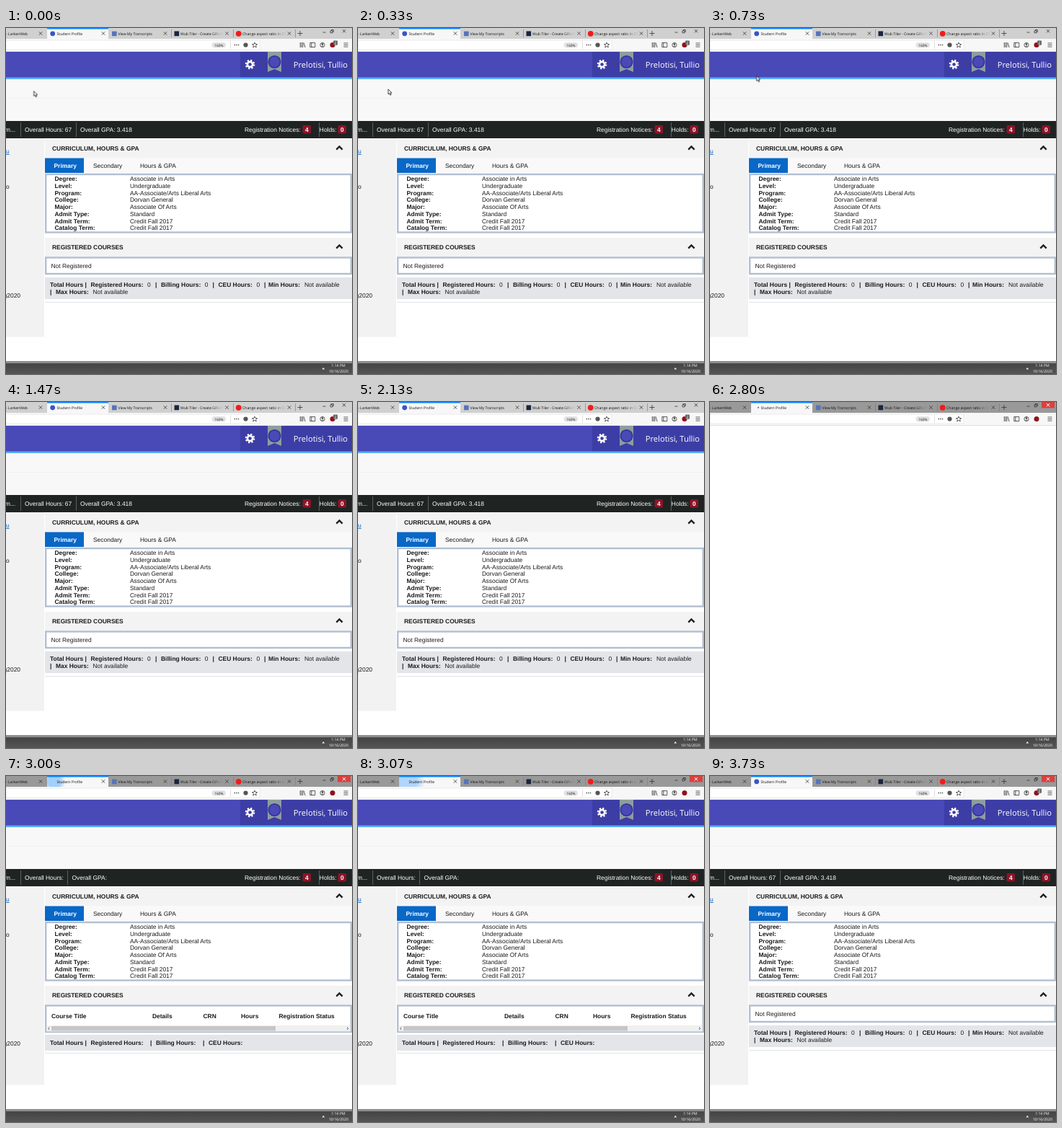
Recreate the animation shown at these times as an HTML page. Size 480 px wide and 480 px high, loop 4070 ms.

```html
<!DOCTYPE html>
<html lang="en">
<head>
<meta charset="utf-8">
<title>Student profile reload</title>
<style>
html, body { margin: 0; width: 100%; height: 100%; overflow: hidden; background: #fff; }
svg { display: block; width: 100vw; height: 100vh; }
text { font: 8.43px "Liberation Sans", Arial, sans-serif; fill: #1a1a1a; white-space: pre; text-rendering: geometricPrecision; }
.b text, text.b { font-weight: 700; }
.ui text { font: 5.15px "Open Sans", "Noto Sans", sans-serif; fill: #111; }
.light text { fill: #fff; }
.head { fill: #f3f3f4; }
.box { fill: #fff; stroke: #b3bfd0; stroke-width: 2.4; }
.line { fill: none; stroke: #333; stroke-width: .8; }

.strip, .icon, .badge, .dot, .burst, .page, .fresh, .ready, .closer, .cursor {
  animation: 4070ms step-end infinite;
}
.strip { animation-name: strip; animation-timing-function: linear; }
.closer { animation-name: closer; animation-timing-function: linear; }
.icon { animation-name: icon; }
.badge { animation-name: badge; }
.dot { animation-name: dot; }
.burst { animation-name: burst; transform-origin: 67px 8px; }
.page { animation-name: page; }
.fresh { animation-name: fresh; }
.ready { animation-name: ready; }
.cursor { animation-name: cursor; }

@keyframes strip { 0%, 55.6% { fill: #d0d0d0; } 62%, 100% { fill: #999; } }
@keyframes closer { 0%, 55.6% { opacity: 0; } 62%, 100% { opacity: 1; } }
@keyframes icon { 0% { opacity: 1; } 55.68% { opacity: 0; } 86.63%, 100% { opacity: 1; } }
@keyframes badge { 0% { opacity: 1; } 55.68% { opacity: 0; } 91.55%, 100% { opacity: 1; } }
@keyframes dot {
  0% { opacity: 0; transform: none; }
  55.68% { opacity: 1; transform: none; animation-timing-function: steps(2, start); }
  58.9% { opacity: 1; transform: translateX(5px); animation-timing-function: steps(3, start); }
  63.7% { opacity: 1; transform: translateX(-5px); animation-timing-function: steps(2, start); }
  67%, 73.6% { opacity: 1; transform: none; }
  73.61%, 100% { opacity: 0; transform: none; }
}
@keyframes burst {
  0% { opacity: 0; transform: scale(.1); }
  73.61% { opacity: .9; transform: scale(.1); animation-timing-function: steps(8, start); }
  86.6% { opacity: 0; transform: scale(1.7); }
  100% { opacity: 0; transform: scale(1.7); }
}
@keyframes page { 0% { opacity: 1; } 68.7% { opacity: 0; } 73.61%, 100% { opacity: 1; } }
@keyframes fresh { 0% { opacity: 0; } 73.61% { opacity: 1; } 80.2%, 100% { opacity: 0; } }
@keyframes ready { 0% { opacity: 1; } 73.61% { opacity: 0; } 80.2%, 100% { opacity: 1; } }
@keyframes cursor {
  0% { transform: translate(38.6px, 87.5px); }
  6.54% { transform: translate(38.6px, 87.5px); animation-timing-function: steps(8, start); }
  19.4% { transform: translate(64.6px, 66.5px); }
  19.56% { transform: translate(64.6px, 66.5px); animation-timing-function: steps(3, start); }
  24.2%, 100% { transform: translate(-12px, 84px); }
}
</style>
</head>
<body>
<svg viewBox="0 0 480 480">
  <defs>
    <clipPath id="tab"><rect x="57" y="1.5" width="85" height="13.5"/></clipPath>
    <radialGradient id="glow"><stop offset=".55" stop-color="#8cc4fb"/><stop offset="1" stop-color="#8cc4fb" stop-opacity="0"/></radialGradient>
    <linearGradient id="bar" x2="0" y2="1"><stop stop-color="#404040"/><stop offset="1" stop-color="#555"/></linearGradient>
    <linearGradient id="fade"><stop offset=".7" stop-color="#fff"/><stop offset="1" stop-color="#000"/></linearGradient>
    <mask id="title4" maskUnits="userSpaceOnUse" x="242" y="0" width="60" height="15"><rect x="242" width="60" height="15" fill="url(#fade)"/></mask>
    <mask id="title5" maskUnits="userSpaceOnUse" x="328" y="0" width="61" height="15"><rect x="328" width="61" height="15" fill="url(#fade)"/></mask>
    <path id="x" d="M-2.2-2.2 2.2 2.2M2.2-2.2-2.2 2.2"/>
    <path id="up" d="M-4.2 2.2 0-2 4.2 2.2" fill="none" stroke="#1c2126" stroke-width="2.4"/>
  </defs>
  <rect width="480" height="480" fill="#fff"/>

  <g class="page">
    <rect y="33" width="480" height="36" fill="#4949b7"/>
    <rect x="325" y="33" width="155" height="36" fill="#3d3da6"/>
    <rect y="68.5" width="480" height="2.7" fill="#5aaef4"/>
    <rect y="71.2" width="480" height="58" fill="#f8f8f8"/>
    <path d="M0 97.5H480" stroke="#f1f1f2"/>
    <g transform="translate(338.5 50.5)" fill="none" stroke="#fff">
      <circle r="3.6" stroke-width="2.6"/>
      <circle r="5.7" stroke-width="2.2" stroke-dasharray="2.2 2.277"/>
    </g>
    <path d="M363 33H382V61L372.5 57 363 61Z" fill="#8f9c9f"/>
    <circle cx="372.5" cy="47" r="8.2" fill="#4949b7" stroke="#3434a0" stroke-width="1.8"/>
    <text x="474" y="55" text-anchor="end" style="font:11.2px 'Open Sans','Noto Sans',sans-serif;fill:#fff">Prelotisi, Tullio</text>

    <rect y="129" width="480" height="24" fill="#1f2422"/>
    <path d="M20.5 131V151M97.5 131V151M434.5 131V151" class="ready" stroke="#59605d"/>
    <path d="M20.5 131V151M85.5 131V151M434.5 131V151" class="fresh" stroke="#59605d"/>
    <rect x="411.5" y="135" width="11.5" height="11.5" rx="2" fill="#8e1428"/>
    <rect x="460.5" y="135" width="11.5" height="11.5" rx="2" fill="#8e1428"/>
    <g class="light">
      <text x="-1" y="143.7">m...</text>
      <text x="26" y="143.7">Overall Hours:</text>
      <g class="ready"><text x="81.8" y="143.7">67</text><text x="103" y="143.7">Overall GPA: 3.418</text></g>
      <text class="fresh" x="91.5" y="143.7">Overall GPA:</text>
      <text x="331" y="143.7">Registration Notices:</text>
      <text x="414.9" y="143.7" class="b">4</text>
      <text x="434.8" y="143.7">Holds:</text>
      <text x="463.9" y="143.7" class="b">0</text>
    </g>

    <rect y="153" width="53" height="275.5" fill="#f2f2f3"/>
    <text x="0" y="174" style="fill:#1767b5;text-decoration:underline">u</text>
    <text x="0" y="223">o</text>
    <text x="20" y="374" text-anchor="end">g2020</text>

    <rect class="head" x="54" y="154.5" width="426" height="26"/>
    <rect x="54" y="180.5" width="426" height="21" fill="#f9f9fa"/>
    <rect x="54" y="180.5" width="54" height="20.5" fill="#0867c7"/>
    <text x="64" y="170" class="b">CURRICULUM, HOURS &amp; GPA</text>
    <use href="#up" x="462.5" y="166.5"/>
    <text x="66.5" y="194" class="b" style="fill:#fff">Primary</text>
    <text x="121" y="194">Secondary</text>
    <text x="186" y="194">Hours &amp; GPA</text>
    <rect class="box" x="55.2" y="203" width="423.6" height="80.5"/>
    <g id="details"></g>

    <rect class="head" x="54" y="291" width="426" height="26.5"/>
    <text x="64" y="307.3" class="b">REGISTERED COURSES</text>
    <use href="#up" x="462.5" y="303.5"/>

    <g class="ready">
      <rect class="box" x="55.2" y="318.5" width="423.6" height="22.5"/>
      <text x="62.5" y="332.8">Not Registered</text>
      <rect x="54" y="346" width="426" height="30" fill="#e4e5e9"/>
      <path d="M54 380.5H480" stroke="#e3e4e8"/>
      <g class="b">
        <text x="61" y="359">Total Hours |</text><text x="117.5" y="359">Registered Hours:</text>
        <text x="207" y="359">|</text><text x="215" y="359">Billing Hours:</text>
        <text x="286.5" y="359">|</text><text x="294.5" y="359">CEU Hours:</text>
        <text x="358" y="359">|</text><text x="364" y="359">Min Hours:</text>
        <text x="61" y="369">|</text><text x="69" y="369">Max Hours:</text>
      </g>
      <text x="196" y="359">0</text><text x="275.8" y="359">0</text><text x="347.5" y="359">0</text>
      <text x="414" y="359">Not available</text><text x="120.5" y="369">Not available</text>
    </g>
    <g class="fresh">
      <rect class="box" x="55.2" y="318.5" width="423.6" height="36.5"/>
      <rect x="56.4" y="346" width="421.2" height="8.4" fill="#f0f0f0"/>
      <rect x="63" y="347" width="311" height="6.4" fill="#c6c6c6"/>
      <path class="line" d="M60.3 348.6 58.5 350.3 60.3 352M473 348.6 474.8 350.3 473 352"/>
      <rect x="54" y="359" width="426" height="22" fill="#e4e5e9"/>
      <path d="M54 384.5H480" stroke="#e3e4e8"/>
      <g class="b">
        <text x="63" y="335.5">Course Title</text><text x="203" y="335.5">Details</text>
        <text x="273.5" y="335.5">CRN</text><text x="326" y="335.5">Hours</text>
        <text x="378.5" y="335.5">Registration Status</text>
        <text x="61" y="373">Total Hours |</text><text x="117.5" y="373">Registered Hours:</text>
        <text x="200" y="373">|</text><text x="208" y="373">Billing Hours:</text>
        <text x="273" y="373">|</text><text x="281" y="373">CEU Hours:</text>
      </g>
    </g>
  </g>

  <g class="ui">
    <rect class="strip" width="480" height="15" fill="#d0d0d0"/>
    <rect y="15" width="480" height="18" fill="#f7f7f8"/>
    <rect y="17" width="352" height="13" fill="#fff" stroke="#dcdcde" stroke-width=".6"/>
    <path d="M0 32.6H480" stroke="#d4d4d6" stroke-width=".7"/>
    <rect x="57" width="85" height="15.3" fill="#f7f7f8"/>
    <g clip-path="url(#tab)"><circle class="burst" cx="67" cy="8" r="52" fill="url(#glow)"/></g>
    <rect x="57" width="85" height="1.5" fill="#0a84ff"/>
    <path d="M229.5 2V13M315.5 2V13M401.5 2V13" stroke="#777" stroke-width=".6"/>
    <text x="0" y="9.8">- LarkenWeb</text>
    <text x="70.5" y="9.8">Student Profile</text>
    <text x="155.5" y="9.8">View My Transcripts</text>
    <g mask="url(#title4)"><text x="242" y="9.8">Wub Tiler - Create GIFs from</text></g>
    <g mask="url(#title5)"><text x="328" y="9.8">Change aspect ratio in Clips</text></g>
    <circle class="icon" cx="64.7" cy="7.8" r="3.4" fill="#3a55c8"/>
    <circle class="dot" cx="67" cy="7.8" r="1" fill="#0a6fd8"/>
    <rect x="147" y="4.6" width="6.6" height="6.6" fill="#5674b8"/>
    <rect x="233.5" y="4.4" width="6.6" height="6.8" fill="#1d2440"/>
    <circle cx="322.7" cy="7.8" r="3.9" fill="#f01c1c"/>
    <g class="line">
      <use href="#x" x="48" y="7.5"/><use href="#x" x="135" y="7.5"/><use href="#x" x="221" y="7.5"/>
      <use href="#x" x="306.5" y="7.5"/><use href="#x" x="393" y="7.5"/>
      <path d="M404.5 7.5H411.5M408 4V11M439.5 6H443.5M450 3.8H453V6.8H450ZM451.3 3.8V2.5H454.3V5.5H453"/>
      <use href="#x" x="469" y="4.2"/>
    </g>
    <g class="closer"><rect x="460" width="18" height="8.4" fill="#d9413f"/><use href="#x" x="469" y="4.2" stroke="#fff"/></g>

    <rect x="285.5" y="20" width="19.5" height="7.4" rx="3.7" fill="#e2e2e4"/>
    <text x="289.3" y="25.6" style="font-size:4.8px">160%</text>
    <path d="M311.5 18.5V28.5" stroke="#d0d0d2" stroke-width=".7"/>
    <path d="M317.3 23.5H323.5" stroke="#333" stroke-width="1.6" stroke-linecap="round" stroke-dasharray="0 2.6"/>
    <circle cx="332.5" cy="23.5" r="3.1" fill="#555"/>
    <path class="line" d="M345 20 346 22.4 348.6 22.6 346.6 24.3 347.3 26.9 345 25.5 342.7 26.9 343.4 24.3 341.4 22.6 344 22.4Z"/>
    <path class="line" stroke-width="1" d="M408.2 20V27M410 20V27M411.8 20V27M413 20.3 415 27M421.8 20.5H428.8V26.5H421.8ZM423.8 20.5V26.5M468.5 21H474.5M468.5 23.5H474.5M468.5 26H474.5"/>
    <circle class="line" cx="439" cy="23.5" r="3.1"/>
    <path d="M437.2 25.5Q439 23.4 440.8 25.5Z" fill="#333"/><circle cx="439" cy="22.5" r="1.2" fill="#333"/>
    <circle cx="453" cy="23.6" r="3.5" fill="#90101c"/>
    <g class="badge"><rect x="454" y="17.5" width="6" height="6.2" rx="1" fill="#666"/><text x="455.6" y="22.5" style="fill:#fff">2</text></g>

    <rect y="462" width="480" height="18" fill="url(#bar)"/>
    <rect y="462" width="480" height="3.2" fill="#8d9090"/>
    <path d="M438.3 473.4 440.3 471 442.3 473.4Z" fill="#eee"/>
    <g class="light" text-anchor="middle">
      <text x="461" y="470" style="fill:#fff">1:14 PM</text>
      <text x="461.3" y="477.5" style="fill:#fff">10/16/2020</text>
    </g>
  </g>

  <path class="cursor" d="M0 0V7L1.6 5.6 2.8 8.2 4 7.6 2.9 5.1H5Z" fill="#fff" stroke="#111" stroke-width=".8"/>
</svg>
<script>
const details = [
  ["Degree:", "Associate in Arts"],
  ["Level:", "Undergraduate"],
  ["Program:", "AA-Associate/Arts Liberal Arts"],
  ["College:", "Dorvan General"],
  ["Major:", "Associate Of Arts"],
  ["Admit Type:", "Standard"],
  ["Admit Term:", "Credit Fall 2017"],
  ["Catalog Term:", "Credit Fall 2017"]
];
document.getElementById("details").innerHTML = details.map(([label, value], row) => {
  const y = 212 + row * 9.78;
  return `<text class="b" x="67.5" y="${y}">${label}</text><text x="172" y="${y}">${value}</text>`;
}).join("");
</script>
</body>
</html>
```
